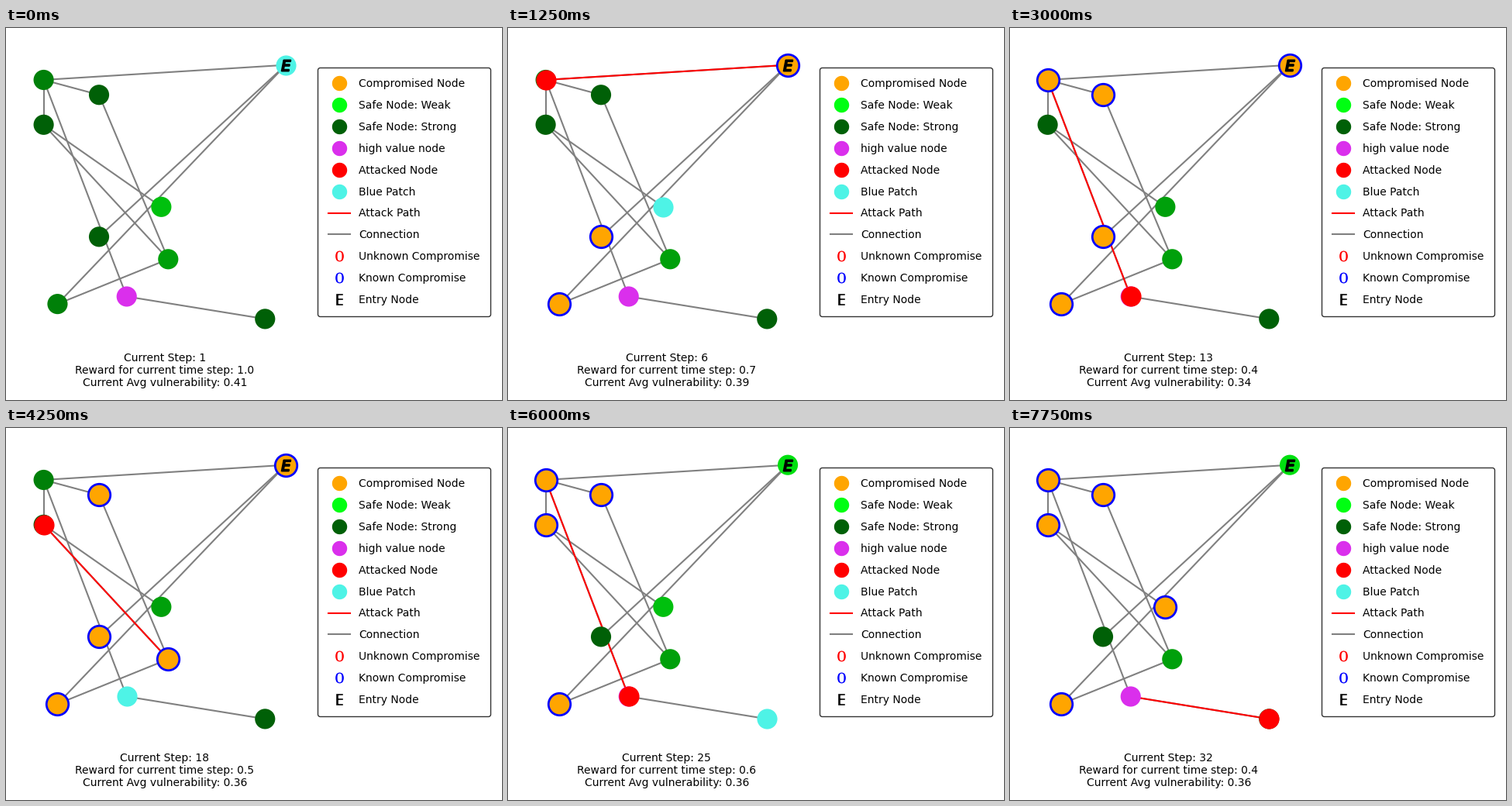
A matplotlib script that plays this animation: 640 by 480 pixels, repeating every 8000 ms.

```python
import matplotlib.pyplot as plt
import numpy as np
from matplotlib.animation import FuncAnimation
from matplotlib.lines import Line2D

W, H, DPI = 640, 480, 100
ORANGE, RED, BLUE, GREY = "orange", "red", "blue", "grey"
CYAN, MAGENTA = "#4EF3E6", "#DA2FEC"

# Nodes sit on a whole-number grid, counted from the top left
ORIGIN = np.array([48.6, 47.7])
PITCH = np.array([8.927, 9.638])
GRID = dict(A=(0, 2), B=(8, 4), C=(0, 8), D=(17, 19), E=(35, 0),
            F=(8, 23), G=(18, 26), H=(2, 32), K=(32, 34), V=(12, 31))
NODES = {name: ORIGIN + PITCH * cell for name, cell in GRID.items()}
EDGES = ["EA", "AB", "AC", "AV", "BG", "CD", "CG", "EF", "EH", "HG", "VK"]
LEVELS = dict(A=128, B=96, C=96, D=192, E=224, F=96, G=160, H=128, K=96)

# One row per step: compromised nodes, attack (from, to), patched node,
# average vulnerability. A dash means none.
STEPS = [row.split() for row in """
- - E 0.41
- E C 0.41
E EF K 0.41
EF EH G 0.40
EFH EA K 0.40
EFH EA D 0.39
AEFH AB C 0.38
ABEFH AV G 0.38
ABEFH BG K 0.37
ABEFH AC D 0.36
ABEFH AV C 0.35
ABEFH BG V 0.35
ABEFHV AV - 0.34
ABEFHV BG K 0.34
BEFGHV GC A 0.35
BEFGHV EA C 0.35
BEFGHV GC K 0.36
BEFGH GC V 0.36
BCEFGH CA D 0.36
ABCEFGH AV K 0.36
ABCEGH AV F 0.35
ABCEH AV G 0.35
ABCEH CD K 0.35
ABCH CD E 0.36
ABCH AV K 0.36
ABCH CD G 0.36
ABCH AV F 0.36
ABCH CD E 0.36
ABCH CD V 0.36
ABCDH AV G 0.36
ABCDHV VK F 0.36
ABCDHV VK - 0.36
""".strip().splitlines()]


def green(level):
    return (0, level / 255, level / 255 / 14)


def points(names):
    return np.array([NODES[n] for n in names if n in NODES]).reshape(-1, 2)


def base_colors(step, patch):
    levels = dict(LEVELS)
    if 7 <= step <= 23:
        levels["D"] = 160
    colors = {n: MAGENTA if n == "V" else green(levels[n]) for n in NODES}
    if patch in colors:
        colors[patch] = "none"
    return list(colors.values())


fig = plt.figure(figsize=(W / DPI, H / DPI), dpi=DPI, facecolor="white")
ax = fig.add_axes([0, 0, 1, 1])
ax.set_xlim(0, W)
ax.set_ylim(H, 0)
ax.axis("off")

for edge in EDGES:
    ax.plot(*points(edge).T, color=GREY, lw=1.5, zorder=1)
path, = ax.plot([], [], color=RED, lw=1.5, zorder=2)


def dots(names, color, z, size=300, width=1.5, **kw):
    return ax.scatter(*points(names).T, s=size, c=color, zorder=z,
                      linewidths=width, **kw)


base = dots(NODES, base_colors(1, "-"), 3)
owned = dots("", ORANGE, 4, 420, 2, edgecolors=BLUE)
patched = dots("", CYAN, 5)
attacked = dots("", RED, 6)
dots("E", "black", 7, 100, marker="$E$")

caption = fig.text(204.8 / W, 18 / H, "", fontsize=10, ha="center",
                   va="baseline")


def key_dot(label, color, marker="o", size=15):
    return Line2D([], [], color="w", marker=marker, markersize=size,
                  markerfacecolor=color, label=label)


def key_letter(label, color, letter):
    return key_dot(label, color, rf"$\mathbf{{{letter}}}$", 11)


keys = [
    key_dot("Compromised Node", ORANGE),
    key_dot("Safe Node: Weak", green(255)),
    key_dot("Safe Node: Strong", green(96)),
    key_dot("high value node", MAGENTA),
    key_dot("Attacked Node", RED),
    key_dot("Blue Patch", CYAN),
    Line2D([], [], color=RED, label="Attack Path"),
    Line2D([], [], color=GREY, label="Connection"),
    key_letter("Unknown Compromise", RED, "0"),
    key_letter("Known Compromise", BLUE, "0"),
    key_letter("Entry Node", "black", "E"),
]
fig.legend(handles=keys, loc="upper left", borderaxespad=0, fontsize=10,
           bbox_to_anchor=(402.2 / W, 1 - 51.2 / H), borderpad=1,
           labelspacing=1, edgecolor="black")


def update(i):
    taken, attack, patch, average = STEPS[i]
    base.set_color(base_colors(i + 1, patch))
    # The high value node keeps its own colour when taken
    owned.set_offsets(points(taken.replace("V", "")))
    patched.set_offsets(points(patch))
    attacked.set_offsets(points(attack[-1]))
    path.set_data(*points(attack).T)
    reward = 1 - len(points(taken)) / len(NODES)
    caption.set_text(f"Current Step: {i + 1}\n"
                     f"Reward for current time step: {reward:.1f}\n"
                     f"Current Avg vulnerability: {average}")
    return base, owned, patched, attacked, path, caption


anim = FuncAnimation(fig, update, frames=len(STEPS), interval=250,
                     repeat=True, repeat_delay=0, blit=False)
plt.show()
```
